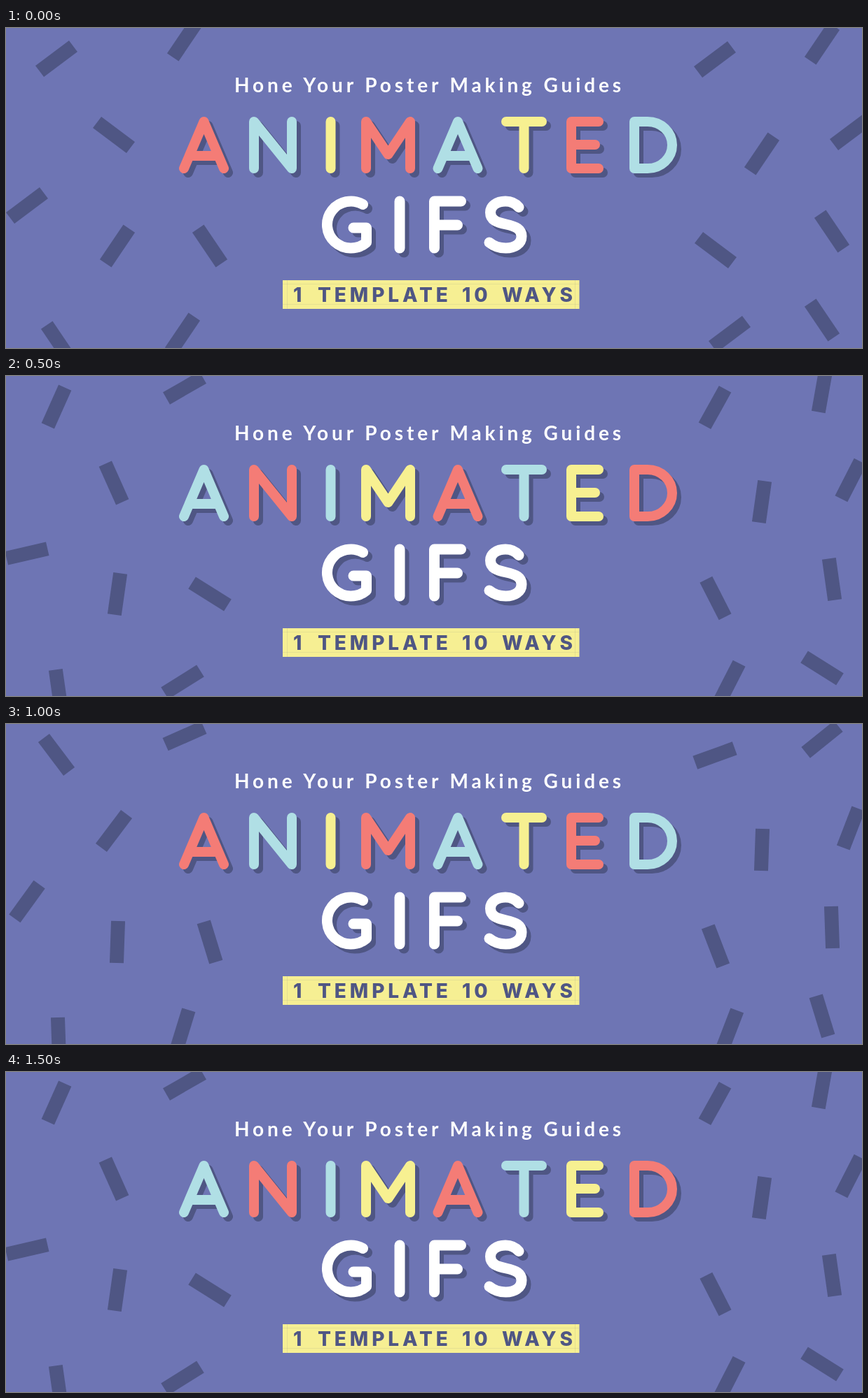
Write an HTML page that moves like this. It is 1222 px wide and 458 px high and loops after 2000 ms.

```html
<!DOCTYPE html>
<html lang="en">
<head>
<meta charset="utf-8">
<title>Animated GIFs banner</title>
<style>
  :root { --coral: #f47c76; --cyan: #b0dfe5; --yellow: #f7f091; --dark: #4f5684; }
  html, body { margin: 0; width: 100%; height: 100%; overflow: hidden; background: #6e75b4; }
  svg { display: block; width: 1222px; height: 458px; }
  .bar { fill: var(--dark); animation: turn 2s step-end infinite; }
  .word { fill: none; stroke-linecap: round; stroke-linejoin: round; }
  .shadow { stroke: var(--dark); }
  .face { stroke: #fff; }
  .swap { animation: swap 1s step-end infinite; }
  .series { font: 700 28px Lato, "Open Sans", sans-serif; letter-spacing: 4.9px; fill: #fff; }
  .badge { font: 800 28px Inter, "Open Sans", sans-serif; letter-spacing: 4.9px; fill: var(--dark); }
  @keyframes turn {
    0%, 100% { rotate: var(--a); }
    25%, 75% { rotate: var(--b); }
    50% { rotate: var(--c); }
  }
  @keyframes swap {
    0%, 100% { stroke: var(--one); }
    50% { stroke: var(--two); }
  }
</style>
</head>
<body>
<svg viewBox="0 0 1222 458">
  <rect width="1222" height="458" fill="#6e75b4"/>
  <g id="bars"></g>
  <text class="series" x="326" y="91.5">Hone Your Poster Making Guides</text>
  <g id="title" role="img" aria-label="ANIMATED GIFS"></g>
  <rect x="395" y="361" width="423.5" height="41" fill="#f6ef93"/>
  <path d="M395 366.5H818M395 395.5H818M401.5 361V402M812.5 361V402" stroke="#4f5684" stroke-opacity=".1"/>
  <text class="badge" y="391.5"><tspan x="410">1</tspan> <tspan x="445">TEMPLATE</tspan> <tspan x="651">10</tspan> <tspan x="708">WAYS</tspan></text>
</svg>
<script>
  const $ = id => document.getElementById(id);
  const add = (parent, tag, attrs, vars = {}) => {
    const el = document.createElementNS("http://www.w3.org/2000/svg", tag);
    for (const k in attrs) el.setAttribute(k, attrs[k]);
    for (const k in vars) el.style.setProperty("--" + k, vars[k]);
    return parent.appendChild(el);
  };

  // A bar rests flat or steep, then turns by its swing's two steps, in direction dir.
  const FLAT = 37, STEEP = 56;
  const bar = (x, y, lean, [mid, far], dir) => {
    const spot = add($("bars"), "g", { transform: `translate(${x} ${y})` });
    add(spot, "rect", { class: "bar", x: -30, y: -10, width: 60, height: 20 }, {
      a: `${lean}deg`, b: `${lean + dir * mid}deg`, c: `${lean + dir * far}deg`,
    });
  };

  const onward = [26, 32];
  bar(255, 17, -STEEP, onward, 1);
  bar(75, 450, STEEP, onward, 1);
  bar(1179, 291, STEEP, onward, 1);
  bar(1013, 318, FLAT, onward, 1);
  bar(159, 312, -STEEP, onward, -1);
  bar(1206, 149, -FLAT, onward, -1);
  bar(1079, 180, -STEEP, onward, -1);
  bar(1033, 438, -FLAT, onward, -1);

  const rocking = [24, -17];
  bar(30, 254, -FLAT, rocking, 1);
  bar(252, 438, -STEEP, rocking, 1);
  bar(291, 312, STEEP, rocking, -1);
  bar(1012, 45, -FLAT, rocking, -1);
  bar(1165, 22, -STEEP, rocking, -1);
  bar(1165, 418, STEEP, rocking, -1);

  const quarter = [29, 90];
  bar(72, 44, -FLAT, quarter, -1);
  bar(154, 153, FLAT, quarter, 1);

  // Centre lines of the letters, 67 high, from their left stem
  const glyphs = {
    A: "M0 67L28.5 0L57 67M8 49H49",
    N: "M0 67V0L54 67V0",
    I: "M0 0V67",
    M: "M0 67V0L31.5 47L63 0V67",
    T: "M0 0H51M25.5 0V67",
    E: "M39 0H0V67H39M0 33H34",
    D: "M0 0H19A35 33.5 0 0 1 19 67H0Z",
    G: "M51 4.5A34 33.5 0 1 0 56 59V38H37.5",
    F: "M38 0H0V67M0 34H33",
    S: "M42.5 8.5C37.5 2.5 31.5 0 23.5 0C10.5 0 2 7 2 16C2 27 11.5 30.5 24.5 33" +
       "C38.5 36 46.5 40 46.5 50C46.5 61 36.5 67 24 67C13.5 67 6.5 64 .5 59",
  };

  const palette = ["coral", "cyan", "yellow"];
  const tint = i => `var(--${palette[Math.abs(i) % 3]})`;

  const word = (text, y, weight, xs, swap) => {
    const layer = (name, shift, vars) => {
      const g = add($("title"), "g", { class: "word " + name, "stroke-width": weight });
      [...text].forEach((ch, i) => add(g, "path", {
        class: vars ? "swap" : "",
        d: glyphs[ch],
        transform: `translate(${xs[i] + shift} ${y + shift})`,
      }, vars && vars(i)));
    };
    layer("shadow", 6);
    layer("face", 0, swap && (i => ({ one: tint(i), two: tint(i - 1) })));
  };
  word("ANIMATED", 134, 14, [254, 354, 463.5, 514, 616.5, 714, 807, 897], true);
  word("GIFS", 248, 15, [458.5, 562, 611.5, 689.5]);
</script>
</body>
</html>
```
